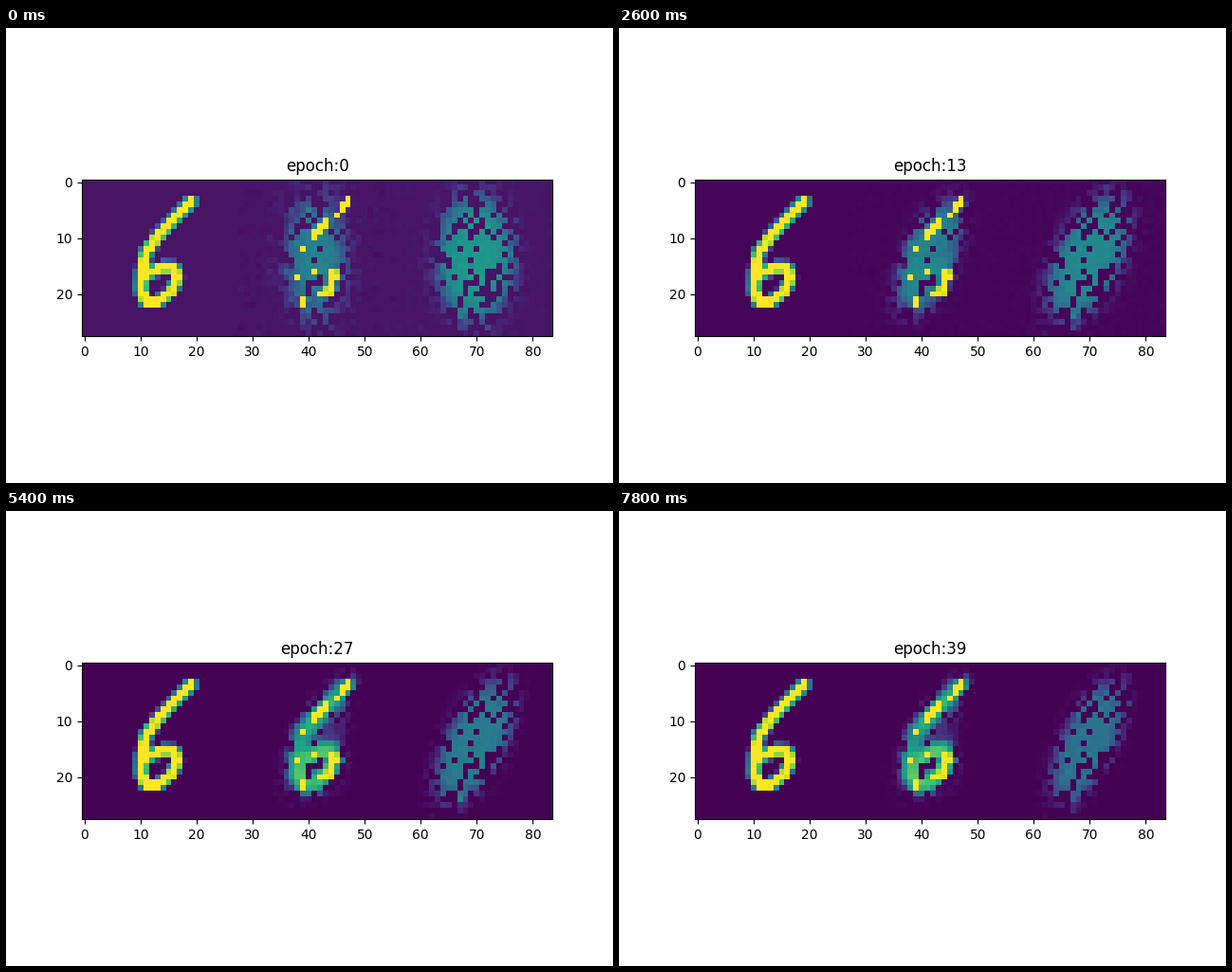
A matplotlib script for the animation above (8 s loop, 640x480 px).

```python
import numpy as np
import matplotlib.pyplot as plt
from matplotlib.animation import FuncAnimation

SIZE = 28
EPOCHS = 40
ROW, COL = np.mgrid[0:SIZE, 0:SIZE].astype(float)

# Key points of the pen stroke, as (col, row)
PEN = np.array([(19, 3.5), (15.5, 7.2), (13, 9.8), (11, 12.5), (10.2, 16),
                (10.1, 19.5), (11, 21.5), (13, 21.4), (15.5, 19.6),
                (16.6, 17), (16, 15.3), (14, 15.2), (11, 16.4)])


def trace(points, count=400):
    """Distance of every cell to the stroke and arc length at that place."""
    steps = np.hypot(*np.diff(points, axis=0).T)
    length = np.concatenate([[0], np.cumsum(steps)])
    arc = np.linspace(0, length[-1], count)
    x = np.interp(arc, length, points[:, 0])
    y = np.interp(arc, length, points[:, 1])
    dist = np.hypot(COL[..., None] - x, ROW[..., None] - y)
    return dist.min(axis=-1), arc[dist.argmin(axis=-1)]


def falloff(dist, width, soft):
    return 1 / (1 + np.exp(np.clip((dist - width) / soft, -30, 30)))


def bump(x, y, radius):
    return np.exp(-((COL - x) ** 2 + (ROW - y) ** 2) / (2 * radius ** 2))


def smooth(t):
    t = np.clip(t, 0, 1)
    return t * t * (3 - 2 * t)


def slanted(x, y, slant, squash):
    dy = ROW - y
    return np.hypot(COL - x + slant * dy, dy * squash)


def between(value, low, high):
    return (value >= low) & (value < high)


rng = np.random.default_rng(6)
pen, arc = trace(PEN)
digit = np.clip((1.45 - pen) / 0.85, 0, 1)
grain = rng.normal(size=(2, SIZE, SIZE))

# Given cells: random off the stroke, a few stretches and dashes on it
mask = rng.random((SIZE, SIZE)) < 0.45 - 0.18 * bump(13, 14, 5)
shown = ((arc < 2.2) | between(arc, 4.9, 9) | between(arc, 24.5, 30)
         | ((arc - 11.6) % 4.5 < 0.9))
mask = np.where(digit > 0.1, shown & (pen < 0.75), mask)


def roughen(field, noise):
    # Plateaus stay flat, the soft rim becomes ragged
    rim = 1 - np.clip(field / 0.4, 0, 1)
    return field * np.exp((0.03 + 0.35 * rim) * noise)


def mean_field(epoch, slant, burst):
    p = epoch / (EPOCHS - 1)
    learnt = smooth((p - 0.2) / 0.6)
    body = (0.42 - 0.32 * learnt) * falloff(
        slanted(13.3, 13.5, slant, 0.5 - 0.12 * burst),
        5 + 0.5 * burst - 0.8 * p, 0.6 + 0.5 * burst + 0.4 * np.exp(-epoch / 3))
    ink = falloff(pen, 1.8 - 0.3 * p, 0.35) * (0.6 - 0.2 * p * bump(11, 14, 2))
    fill = 0.2 * bump(13.5, 18.5, 2.5)
    dip = 0.045 * burst * np.exp(-COL / 4)
    return body + learnt * (ink + fill) - dip


def spread_field(epoch, slant, burst):
    p = epoch / (EPOCHS - 1)
    dist = slanted(13.8, 13.6, slant, 0.62 - 0.14 * p - 0.45 * burst)
    level = 0.5 - 0.12 * p - 0.07 * burst
    return level * falloff(dist, 6.7 - 1.7 * p, 0.8 - 0.2 * p + 2 * burst)


def panels(epoch):
    slant = 0.38 * (1 - np.exp(-epoch / 6))
    burst = np.exp(-((epoch - 5) / 2.5) ** 2)
    flicker = np.random.default_rng(100 + epoch).normal(size=grain.shape)
    noise = 0.8 * grain + 0.4 * flicker
    haze = 0.008 * np.exp(-epoch / 8) * flicker
    mean = roughen(mean_field(epoch, slant, burst), noise[0]) + haze[0]
    spread = roughen(spread_field(epoch, slant, burst), noise[1]) + abs(haze[1])
    return np.hstack([digit, np.where(mask, digit, mean),
                      np.where(mask, 0, spread)])


fig, ax = plt.subplots(figsize=(6.4, 4.8), dpi=100)
image = ax.imshow(panels(0), cmap="viridis", vmax=1)
title = ax.set_title("epoch:0")


def draw(epoch):
    image.set_data(panels(epoch))
    image.set_clim(-0.055 * np.exp(-epoch / 12), 1)
    title.set_text(f"epoch:{epoch}")
    return image, title


def reset():
    return draw(0)


anim = FuncAnimation(fig, draw, frames=EPOCHS, init_func=reset,
                     interval=200, repeat=True, repeat_delay=0)
plt.show()
```
